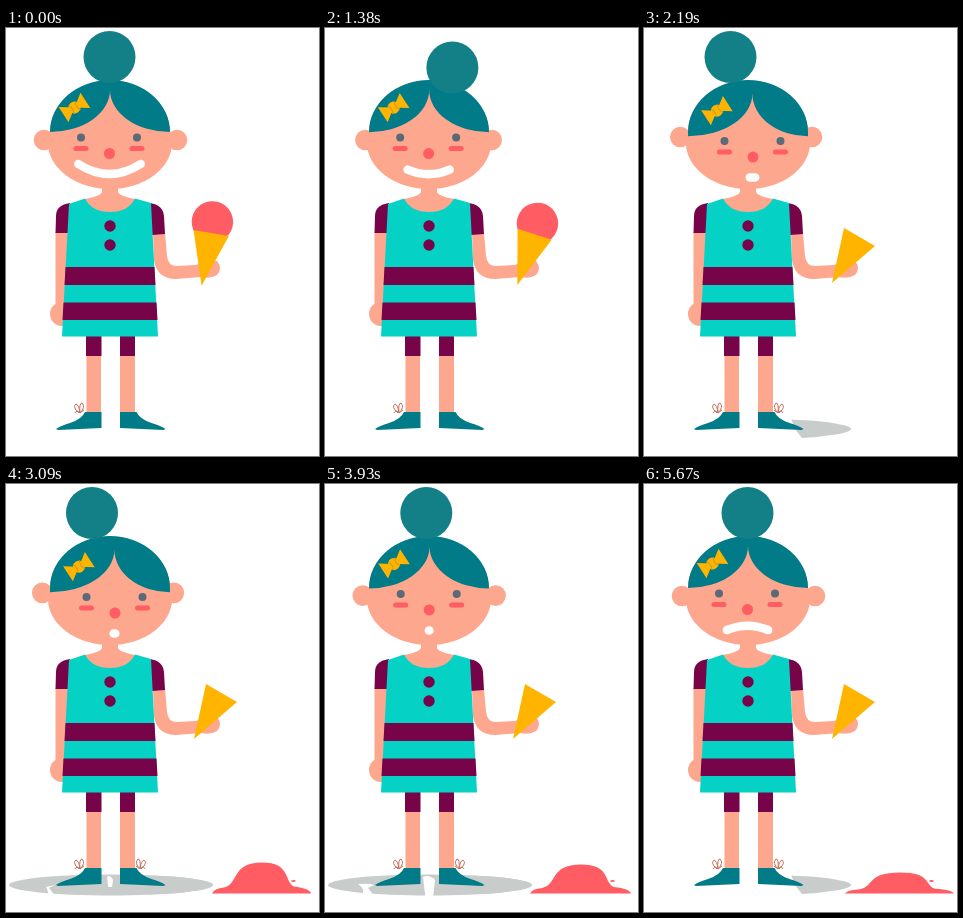
Animation of 313 by 428 pixels, one loop 5700 ms. Source, as an HTML page:

```html
<!DOCTYPE html>
<html lang="en">
<head>
<meta charset="utf-8">
<title>Dropped ice cream</title>
<style>
html, body { margin: 0; width: 100%; height: 100%; overflow: hidden; background: #fff; }
svg { display: block; width: 313px; height: 428px; }
.skin { fill: #fda78e; }
.hair { fill: #017b87; }
.plum { fill: #770349; }
.pink { fill: #ff5c63; }
.gold { fill: #ffb400; }
.lace { fill: none; stroke: #c4705c; stroke-width: 1; }
</style>
</head>
<body>
<svg viewBox="0 0 313 428">
  <defs>
    <clipPath id="rightSide"><path d="M146 388H212V414H161L151 401Z"/></clipPath>
    <path id="laceLoop" d="M73 385Q66 379 70 376Q73 377 74 385Q73 375 76 375Q80 379 74 385M69 385Q71 381 74 385L78 382"/>
    <path id="shoe" d="M50 401Q54 398 64 395Q76 391 79 384H95.500V400L52 402Z"/>
    <path id="wing" d="M0 0L13 -9V9Z"/>
    <ellipse id="shade" cx="105" cy="401" rx="102" ry="10.500" fill="#c8cccb"/>
  </defs>

  <use id="shadowRight" href="#shade" clip-path="url(#rightSide)"/>
  <g id="shadowFull">
    <use href="#shade"/>
    <path id="gapLeft" fill="#fff"/>
    <path id="gapMid" fill="#fff"/>
  </g>

  <path class="skin" d="M80.500 326H95V387H80.500ZM114 326H129V387H114Z"/>
  <path class="plum" d="M80 307H95.500V328H80ZM114 307H129V328H114Z"/>
  <use href="#shoe" class="hair"/>
  <use href="#shoe" class="hair" transform="translate(209.500 0) scale(-1 1)"/>
  <use href="#laceLoop" class="lace"/>
  <use id="laceRight" href="#laceLoop" class="lace" transform="translate(208 0) scale(-1 1)"/>

  <circle class="skin" cx="56" cy="286" r="12"/>
  <path class="skin" d="M49.500 204H62V285H49.500Z"/>
  <path class="skin" d="M147 205H159L161 228Q162 238 171 238L190 237Q204 231 211 233Q217 240 211 247Q205 251 195 249L170 251Q151 251 148 232Z"/>
  <path class="plum" d="M64 175Q50 177 50 188L49.500 205H63ZM144 175Q157 177 158 188L159 206L146 207Z"/>
  <path class="skin" d="M96 154H112V164Q113 168 129 171V185H79V171Q95 168 96 164Z"/>
  <path fill="#05d2c4" d="M63 176L79 170.500Q86 184 104 184Q122 184 129 170.500L145 175L152 308.500H56Z"/>
  <path class="plum" d="M59.500 239H148.500L149.500 257H58.500ZM57.500 274.500H150.500L151.500 292H56.500Z"/>
  <circle class="plum" cx="104" cy="198" r="5.700"/>
  <circle class="plum" cx="104" cy="217" r="5.700"/>

  <path id="puddle" class="pink" d="M-50 0Q-48 -5 -38 -6C-23 -9 -31 -31 0 -31C29 -31 22 -12 32 -7Q48 -5 49 0Z"/>
  <ellipse id="drop" class="pink" cx="287.500" cy="397" rx="2.300" ry="1"/>
  <g id="cone">
    <circle id="scoop" class="pink" r="20.700"/>
    <path class="gold" d="M200 200L231 218L188 255Z"/>
  </g>

  <circle id="earL" class="skin" r="10.300"/>
  <circle id="earR" class="skin" r="10.300"/>
  <path class="skin" d="M44 104A60 50 0 0 1 164 104Q166 109 166 115A62 46 0 0 1 42 115Q42 109 44 104Z"/>
  <path id="fringe" class="hair"/>
  <circle id="bun" r="26" fill="#137f87"/>
  <g id="bow">
    <g transform="rotate(-33)">
      <use href="#wing" class="gold"/>
      <use href="#wing" class="gold" transform="scale(-1 1)"/>
      <circle class="gold" r="6"/>
      <path fill="none" stroke="#c79c2d" d="M-4 -5Q-1 0 -4 5M4 -5Q1 0 4 5"/>
    </g>
  </g>
  <g id="face">
    <circle cx="-28" r="4" fill="#5b6a78"/>
    <circle cx="28" r="4" fill="#5b6a78"/>
    <rect class="pink" x="-35.500" y="8.500" width="15" height="5" rx="2.500"/>
    <rect class="pink" x="20.500" y="8.500" width="15" height="5" rx="2.500"/>
    <circle class="pink" cx=".5" cy="16" r="5.500"/>
  </g>
  <path id="mouth" fill="none" stroke="#fff" stroke-width="8.500" stroke-linecap="round"/>
</svg>
<script>
const LOOP = 5700, STEP = 30;
const el = {};
document.querySelectorAll('[id]').forEach(n => el[n.id] = n);

// sway: bun offset, look: sideways gaze, mood: 1 smiles, below 0 frowns
const poses = [
  { at: 630, sway: 0, look: 0, mood: 1 },
  { at: 990, sway: 17, look: -3, mood: .8 },
  { at: 1740, sway: 30, look: 3, mood: .56 },
  { at: 2190, sway: -17, look: 5.5, mood: .08 },
  { at: 3090, sway: -17.5, look: 5.5, mood: .02 },
  { at: 4170, sway: 0, look: 0, mood: 0 },
  { at: 5100, sway: 0, look: 0, mood: -.66 }
];

const span = (t, a, b) => Math.min(1, Math.max(0, (t - a) / (b - a)));
const smooth = u => u * u * (3 - 2 * u);
const mix = (a, b, u) => a + (b - a) * u;
const move = (n, x, y) => n.setAttribute('transform', `translate(${x} ${y})`);
const show = (n, on) => n.setAttribute('visibility', on ? 'visible' : 'hidden');
const shape = (n, d) => n.setAttribute('d', d);

function poseAt(t) {
  let i = 0;
  while (i < poses.length - 2 && t >= poses[i + 1].at) i++;
  const [a, b] = [poses[i], poses[i + 1]];
  const u = smooth(span(t, a.at, b.at));
  const value = key => mix(a[key], b[key], u);
  return { sway: value('sway'), look: value('look'), mood: value('mood') };
}

function drawHead(t) {
  const { sway, look, mood } = poseAt(t);
  const droop = .65 * Math.max(0, look);
  const lean = Math.max(0, sway) / 30;
  move(el.bun, 103.5 + sway, 29 + 11 * lean * (2 - lean));
  move(el.face, 103 + look, 109.5 + droop);
  move(el.bow, 68.5 + .8 * look, 79.5 + .9 * droop);

  const earY = 112 + .18 * Math.min(0, sway);
  move(el.earL, 38 + .1 * sway, earY);
  move(el.earR, 171 - .18 * Math.abs(sway), earY);

  const px = 104 + .8 * look, py = 62 + droop, hem = 104 + 1.2 * droop;
  shape(el.fringe, `M44 ${hem}V104A60 52 0 0 1 164 104V${hem}`
    + `A${164 - px} ${hem - py} 0 0 1 ${px} ${py}A${px - 44} ${hem - py} 0 0 1 44 ${hem}Z`);

  const mx = 103.5 + .9 * look, half = 31 * Math.abs(mood) + .2;
  const my = 146 + droop - 10 * Math.max(0, mood) ** 2;
  shape(el.mouth, `M${mx - half} ${my}Q${mx} ${my + 20 * mood * Math.abs(mood)} ${mx + half} ${my}`);
}

function drawCone(t) {
  const tilt = span(t, 630, 1740) ** 2.25;
  el.cone.setAttribute('transform', `rotate(${-20.5 * (1 - tilt)} 199.5 235.5)`);
  const u = span(t, 1740, 2130);
  move(el.scoop, 220.5 + 31 * u * (2 - u), 199 + 189 * u * u);
  show(el.scoop, u < 1);
}

function drawPuddle(t) {
  const grow = smooth(span(t, 2220, 2940));
  const melt = span(t, 3090, 5670) ** 1.4;
  el.puddle.setAttribute('transform',
    `translate(256 409.5) scale(${grow * mix(1, 1.1, melt)} ${grow * mix(1, .68, melt)})`);
  show(el.puddle, grow > 0);
  show(el.drop, grow === 1);
}

function drawShadow(t) {
  show(el.shadowRight, t >= 1500);
  show(el.laceRight, t >= 1500);
  show(el.shadowFull, t >= 2250 && t < 4200);
  const g = span(t, 3090, 3930);
  const x = mix(40, 33, g), y = mix(403, 400, g), w = mix(3, 6, g);
  shape(el.gapLeft, `M${x} ${y}Q44 ${y - 1} 49 401L43 404L50 413H${x + 3}Q42 406 ${x} ${y}Z`);
  shape(el.gapMid, `M${104 - w} 393Q104 390 ${104 + w} 396L${104 + w * .7} ${mix(403, 413, g)}H${104 - w * .6}Z`);
}

const start = performance.now();
function tick() {
  const t = Math.floor((performance.now() - start) % LOOP / STEP) * STEP;
  drawHead(t);
  drawCone(t);
  drawPuddle(t);
  drawShadow(t);
  requestAnimationFrame(tick);
}
tick();
</script>
</body>
</html>
```
